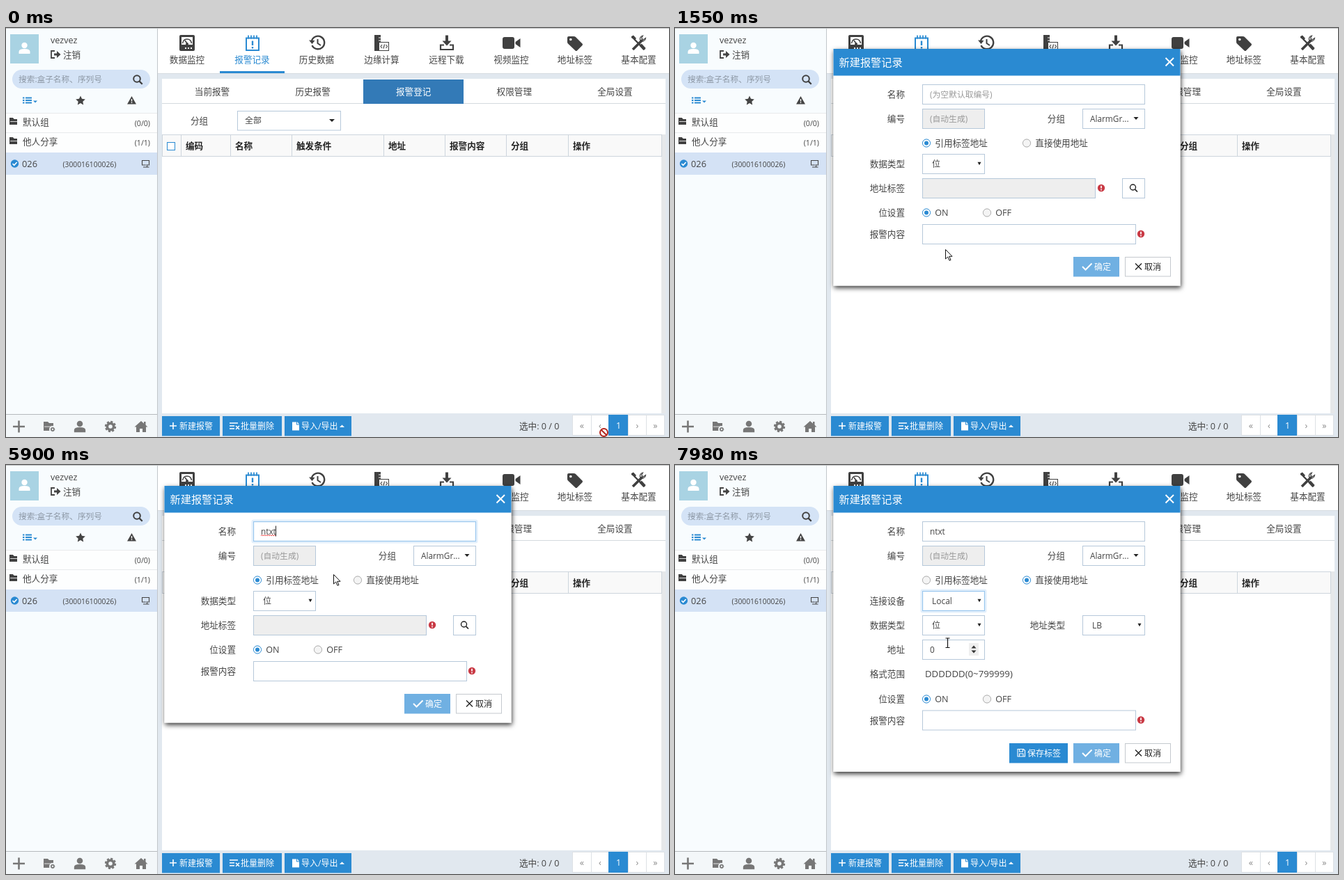
These frames come from a looping animation (952x588 px, 8000 ms). An HTML page:

```html
<!DOCTYPE html>
<html lang="zh-CN">
<head>
<meta charset="utf-8">
<title>报警登记</title>
<style>
html, body { margin: 0; width: 100%; height: 100%; overflow: hidden; background: #e1e8ef; }
svg { display: block; }
text { font-family: "Open Sans", "Noto Sans CJK SC", "Noto Sans CJK", sans-serif; white-space: pre; }
</style>
</head>
<body>
<svg id="stage" width="952" height="588" viewBox="0 0 952 588">
  <defs>
    <filter id="shadow" x="-10%" y="-10%" width="120%" height="120%">
      <feDropShadow dx="1" dy="3" stdDeviation="3.8" flood-opacity=".8"/>
    </filter>
  </defs>
  <g id="base"></g>
  <g id="dialog"></g>
  <g id="cursor"></g>
</svg>
<script>
const LOOP = 8000;
const BLUE = '#2a8ad2', INK = '#444', DARK = '#404040', EDGE = '#b6c8da', GREY = '#777';
const $ = id => document.getElementById(id);

// Drawing helpers: each returns SVG markup. Text is placed by its vertical centre.
const text = (x, cy, s, { size = 12.6, fill = INK, anchor = 'start', weight = 400 } = {}) =>
  `<text x="${x}" y="${cy + size * .37}" font-size="${size}" fill="${fill}" text-anchor="${anchor}" font-weight="${weight}">${s}</text>`;
const box = (x, y, w, h, fill, stroke, r = 0) => stroke
  ? `<rect x="${x + .5}" y="${y + .5}" width="${w - 1}" height="${h - 1}" rx="${r}" fill="${fill}" stroke="${stroke}"/>`
  : `<rect x="${x}" y="${y}" width="${w}" height="${h}" rx="${r}" fill="${fill}"/>`;
const shape = (d, fill) => `<path d="${d}" fill="${fill}"/>`;
const line = (d, stroke, w = 1) => `<path d="${d}" fill="none" stroke="${stroke}" stroke-width="${w}"/>`;
const dot = (x, y, r, fill, stroke = 'none', w = 1) =>
  `<circle cx="${x}" cy="${y}" r="${r}" fill="${fill}" stroke="${stroke}" stroke-width="${w}"/>`;
const caret = (x, y, w = 8, h = 4, fill = '#222') =>
  shape(`M${x - w / 2} ${y - h / 2}h${w}l${-w / 2} ${h}z`, fill);
const lens = (x, y, r, color, w) =>
  dot(x - 1, y - 1, r, 'none', color, w) + line(`M${x + r * .65 - .5} ${y + r * .65 - .5}l${r * .85} ${r * .85}`, color, w + .3);
const person = (x, y, k, fill) =>
  `<g transform="translate(${x} ${y}) scale(${k})">` + dot(0, -4, 4.2, fill) + shape('M-8 8v-3q0-4 8-4t8 4v3z', fill) + '</g>';
const folder = (x, y, w, h, fill) =>
  shape(`M${x} ${y}h${w * .4}l2 2h${w * .6 - 3}v${h - 2}h${1 - w}z`, fill) + line(`M${x + 1} ${y + h * .55}h${w - 2}`, '#fff', .8);
const gear = (x, y, k, fill) =>
  `<g transform="translate(${x} ${y}) scale(${k})">` + dot(0, 0, 5, 'none', fill, 4) +
  `<circle r="7.6" fill="none" stroke="${fill}" stroke-width="2.4" stroke-dasharray="3.4 2.57"/></g>`;

function sidebar() {
  let s = box(0, 0, 217, 588, '#f8fcfe') + box(6, 9, 41, 42, '#a9d3e3') + person(26.5, 29, 1, '#fff');
  s += text(64, 17.5, 'vezvez') + text(82, 38.5, '注销');
  s += line('M70 33h-5v10h5', INK, 1.8) + shape('M69 36.5h4v-3.5l5.500 5l-5.500 5v-3.500h-4z', INK);
  s += box(9, 60, 198, 27, '#d4e3f6', null, 13.5);
  s += text(18, 74, '搜索:盒子名称、序列号', { size: 11.7, fill: '#8d98a5' }) + lens(189, 74, 4.8, DARK, 2);
  s += line('M24 100.500h2.500m1.500 0h9M24 104h2.500m1.500 0h9M24 107.500h2.500m1.500 0h9', BLUE, 1.8) + caret(42, 106, 6, 3, BLUE);
  s += shape('M107 97.500l2 4.300l4.800.6l-3.500 3.300l.9 4.700l-4.200-2.300l-4.200 2.300l.9-4.700l-3.500-3.300l4.800-.6z', INK);
  s += shape('M180.500 98l6.500 11.500h-13z', INK) + line('M180.500 102v3.500m0 1v1.500', '#fff', 1.4);
  s += box(0, 122, 217, 57, '#fdfefe') + line('M0 122.500h217M0 150.500h217', '#e8eaec');
  [['默认组', '(0/0)', 135.5], ['他人分享', '(1/1)', 163.5]].forEach(([name, count, y]) => {
    s += folder(5, y - 6.5, 12, 10, DARK) + text(24, y, name);
    s += text(207, y + 1.5, count, { size: 10.6, anchor: 'end' });
  });
  s += box(0, 179, 217, 32, '#d4e2f5') + dot(12.5, 195, 5.7, BLUE) + line('M9.500 195l2.200 2.300l4-4.300', '#fff', 1.6);
  s += text(23, 195, '026', { size: 12.8 }) + text(81.5, 196, '(300016100026)', { size: 10.3 });
  s += line('M201 197h-5.500v-6.500h10v6.500h-2M197 200h5M202.500 196v4h3', INK, 1.1);
  s += box(0, 556, 217, 32, '#f3f7f9') + line('M0 555.500h217', '#b5b9bd');
  s += line('M10 573h17M18.500 564.500v17', GREY, 2.6);
  s += folder(54, 566, 15, 13, GREY) + dot(67, 577, 5, '#f3f7f9') + gear(67, 577, .38, GREY);
  s += person(106, 573, 1.02, GREY) + gear(150, 573, .93, GREY);
  s += shape('M194 565l9.500 8.500h-2.500v7.500h-5v-5h-4v5h-5v-7.500h-2.500z', GREY) + box(198, 566, 2.5, 5, GREY);
  return s + line('M217.500 0v588', '#c2c6ca');
}

function navBar() {
  let s = box(218, 0, 734, 65, '#fff') + line('M0 .5h952', '#c2c4c6') + line('M218 65.500h734', '#d5dbe0');
  const labels = ['数据监控', '报警记录', '历史数据', '边缘计算', '远程下载', '视频监控', '地址标签', '基本配置'];
  const at = [260, 353.5, 446, 539.5, 632.5, 725.5, 817, 908.5];
  labels.forEach((v, i) => s += text(at[i], 45.5, v, { anchor: 'middle', fill: i == 1 ? BLUE : INK }));
  s += box(307, 62, 93, 3, BLUE);
  // gauge, calendar, clock
  s += box(249, 10, 22, 23, DARK, null, 2) + shape('M252 13h16v11h-16z', '#fff') + line('M253.500 22q1-6 6.500-6t6.500 6M260 22l-3-4', DARK, 1.6);
  s += dot(260, 23, 2, DARK) + line('M257 29h2M261 29h2M265 29h2', '#fff', 2);
  s += line('M345 14.500h18v17.500h-18z', BLUE, 2) + line('M348 10.500v5M352 10.500v5M356 10.500v5M360 10.500v5', BLUE, 1.7) + line('M354 18.500v6.500m0 2v2.500', BLUE, 2.4);
  s += line('M439.500 25a9.300 9.300 0 1 0-.7-6', DARK, 2.4) + shape('M435 17.500l4.500 5.500l4-5z', DARK) + line('M447.500 16v6l4.500 3', DARK, 2);
  // ruler with code box, download, camera
  s += box(529, 10, 9, 23, DARK) + line('M535 14h3M535 18h3M535 22h3M535 26h3', '#fff') + box(535, 20, 15, 13, '#fff', DARK);
  s += line('M540 24l-2 2.500l2 2.500M545.500 24l2 2.500l-2 2.500M543.500 23.500l-1.500 6', DARK, 1.1);
  s += shape('M631 10.500h4v8h4.500l-6.500 7l-6.500-7h4.500z', DARK) + line('M629 24.500h-5v6.500h18v-6.500h-5', DARK, 2.2);
  s += box(713, 13, 17, 17, DARK, null, 3) + shape('M731.500 20l7-5v13l-7-5z', DARK);
  // tag, tools
  s += `<path fill-rule="evenodd" fill="${DARK}" d="M806 14q0-2 2-2h7q2 0 3 1l9.500 9.500q1.200 1.200 0 2.500l-7.500 7.500q-1.200 1.200-2.500 0l-10.500-10q-1-1-1-2.500zM809 16.500a1.800 1.800 0 1 0 3.600 0a1.800 1.800 0 1 0-3.600 0"/>`;
  s += line('M902 16l15 15', DARK, 2.4) + line('M911 24l6 6.500', DARK, 4.6) + line('M914 17l-14 14', DARK, 3.8);
  s += line('M918.500 14.500l-3.500 2.500l-2.500-2.500l2-3.500a5 5 0 0 0-3.500 7.500a5 5 0 0 0 7.500-4z', DARK, 1.2) + shape('M898 12l3-1.500l4 4.500l-2.500 2.500l-4.500-3.500z', DARK);
  return s;
}

function content() {
  let s = box(224, 73, 723, 481, '#fff') + box(513, 74, 144, 35, '#337ab7');
  ['当前报警', '历史报警', '报警登记', '权限管理', '全局设置'].forEach((v, i) =>
    s += text(296 + i * 144.6, 91.5, v, { anchor: 'middle', fill: i == 2 ? '#fff' : INK, weight: i == 2 ? 500 : 400 }));
  s += line('M224 108.500h289M657 108.500h290', '#d4dade');
  s += text(265, 133, '分组') + box(332, 119, 149, 28.5, '#fff', EDGE) + text(343, 133, '全部', { size: 11.9 }) + caret(468, 133);
  s += box(941, 153, 6, 401, '#e6e8ea') + box(224, 153, 718, 32, '#f9f9f9', '#cdd5dd');
  [251, 322, 410, 542, 630, 718, 807].forEach((x, i) => {
    s += line(`M${x + .5} 153v32`, '#cdd5dd');
    s += text(x + 7, 169.5, ['编码', '名称', '触发条件', '地址', '报警内容', '分组', '操作'][i], { weight: 700, fill: '#222' });
  });
  s += box(231, 164, 12, 12, '#fff', BLUE);
  const label = { size: 12, fill: '#fff', weight: 500 };
  s += box(224, 558, 83, 28.5, BLUE) + line('M235 572h10M240 567v10', '#fff', 1.6) + text(249, 572.5, '新建报警', label);
  s += box(311, 558, 85, 28.5, BLUE) + line('M321 568h12M321 572h7M321 576h7M330 572l5 5m0-5l-5 5', '#fff', 1.5) + text(337, 572.5, '批量删除', label);
  s += box(400, 558, 96, 28.5, BLUE) + shape('M411 566.500h6v4h4v8h-10zM418 566l3 3.500h-3z', '#fff') + text(424, 572.5, '导入/导出', label);
  s += shape('M479 574h7l-3.500-3.500z', '#fff') + text(737, 572, '选中: 0 / 0');
  [813, 840, 865, 893, 919].forEach((x, i) => {
    const w = [28, 26, 29, 27, 27][i], on = i == 2;
    s += box(x, 556, w, 30, on ? BLUE : '#fff', on ? BLUE : '#dde1e5');
    s += text(x + w / 2, 571, '«‹1›»'[i], { anchor: 'middle', fill: on ? '#fff' : '#888' });
  });
  return s;
}

// Form parts; y is the centre line of the row.
const label = (y, s, x = 330) => text(x, y + .5, s, { anchor: 'end' });
const field = (x, y, w, s = '', off = false) =>
  box(x, y - 14, w, 29, off ? '#eee' : '#fff', EDGE) + text(x + 11, y + .5, s, { size: 11.8, fill: off || s[0] == '(' ? '#999' : INK });
const select = (x, y, s) => field(x, y, 90) +
  `<svg x="${x + 14}" y="${y - 14}" width="52" height="29">${text(0, 14.8, s, { size: 12 })}</svg>` + caret(x + 82, y, 5, 4.5);
const radio = (x, y, on, s) => dot(x, y + .5, 5.6, on ? '#fff' : '#f4f4f4', on ? BLUE : '#aaa') +
  (on ? dot(x, y + .5, 3, BLUE) : '') + text(x + 12.3, y + .5, s);
const bang = (x, y) => dot(x, y, 5.2, '#c93a45') + line(`M${x} ${y - 3.2}v3.800m0 1.200v1.600`, '#fff', 1.7);
const glow = (x, y, w, k = 1) => `<g opacity="${k}" fill="none">` +
  `<rect x="${x - .5}" y="${y - 14.5}" width="${w + 1}" height="30" rx="1" stroke="#e2effb" stroke-width="4"/>` +
  `<rect x="${x + .5}" y="${y - 13.5}" width="${w - 1}" height="28" stroke="#98c6ee"/></g>`;
const group = (y, s) => label(y, '分组', 560) + field(585, y, 90, s) + caret(662, y, 7, 4);
const sources = (y, direct) => radio(361, y, !direct, '引用标签地址') + radio(505, y, direct, '直接使用地址');
const message = (y, yText) => label(y, '位设置') + radio(361, y, true, 'ON') + radio(448, y, false, 'OFF') +
  label(yText, '报警内容') + field(355, yText, 307) + bang(669, yText);
const tagRow = y => label(y, '地址标签') + field(355, y, 249, '', true) + bang(612, y) + field(642, y, 33) + lens(658.5, y, 4, '#222', 1.4);
const actions = y => box(572, y - 14, 66, 28.5, '#70b0e2') + line(`M585 ${y}l4.500 4.500l9-9`, '#fff', 2) +
  text(602, y + .5, '确定', { size: 12, fill: '#fff', weight: 500 }) + box(646, y - 14, 66, 28.5, '#fff', '#c4c9ce') +
  line(`M661 ${y - 4.5}l9 9m0-9l-9 9`, '#222', 1.4) + text(674, y + .5, '取消', { size: 12, fill: '#222' });

function loadingForm(t) {
  let s = label(95, '名称') + field(355, 95, 320, '(为空默认取编号)') + label(130, '名称') + field(355, 130, 307) + bang(669, 130);
  s += label(165, '编号') + field(355, 165, 90, '(自动生成)', true) + group(165, '请选择');
  s += line('M641.500 164a5 5 0 0 1 8.500-3M651.500 166a5 5 0 0 1-8.500 3', '#222', 2) + shape('M652.500 158v6h-6zM640.500 172v-6h6z', '#222') + line('M644 167l5-4', BLUE, 2);
  s += sources(200, false) + label(230, '数据类型') + select(355, 230, '位') + tagRow(265);
  const lead = 2 + Math.floor((t - 1300) / 80);
  for (let i = 0; i < 5; i++) {
    const gap = Math.abs(((i - lead + 2) % 5 + 5) % 5 - 2);
    s += `<g opacity="${[1, .58, .32][gap]}">${box(462 + i * 7.6, 262, 6, 13, BLUE)}</g>`;
  }
  s += box(355, 289, 12, 12, '#fff', BLUE) + text(371, 295.5, '使用字寄存器的按位索引', { size: 12.45 }) + text(512, 295.5, '[固件不支持]', { size: 12.3, fill: '#e01515' });
  s += label(325, '地址') + field(355, 325, 249, '', true) + bang(612, 325);
  s += label(360, '按位索引') + field(355, 360, 77) + bang(440, 360);
  s += label(395, '地址') + dot(456.5, 398, 1.5, '#222') + label(427.5, '格式范围') + label(457, '条件');
  for (const y of [457, 492]) s += select(355, y, '等于') + field(471, y, 89, '0');
  return s + select(585, 457, '无') + message(527, 558);
}

const TYPED = [3330, 4040, 4420, 4570], ENDS = [366.5, 373.5, 377.5, 383.5, 387.5];
const BLINKS = [2090, 2570, 3100, 3880, 4040, 5120, 5350, 6200];

function nameRow(t) {
  const n = TYPED.filter(k => t >= k).length;
  let s = label(95, '名称') + field(355, 95, 320, n ? 'ntxt'.slice(0, n) : '(为空默认取编号)');
  if (t >= 2020 && t < 6280) s += glow(355, 95, 320, Math.min(1, .5 + (t - 2020) / 140));
  if (BLINKS.filter(k => t >= k).length % 2) s += line(`M${ENDS[n]} 87.500v15`, '#222');
  if (t >= 5350 && t < 6280) s += line('M366 102' + 'l1.500-1.500l1.500 1.500'.repeat(7), '#e33', .9);
  return s + label(130, '编号') + field(355, 130, 90, '(自动生成)', true) + group(130, 'AlarmGr...');
}

const tagForm = t => nameRow(t) + sources(165, false) + label(195, '数据类型') + select(355, 195, '位') +
  tagRow(230) + message(265, 296) + actions(343);

const DEVICES = ['KAVnor MRTP', 'XQZ', 'XQZ DK 500N_OrbVEL', 'Local'];

function directForm(t, pointerY) {
  const local = t >= 7830, picked = t >= 7680;
  let s = nameRow(t) + sources(165, true);
  if (t < 7130) s += dot(505, 165.5, 6.6, 'none', '#b5d6f1', 1.4);
  s += label(195, '连接设备') + select(355, 195, DEVICES[picked ? 3 : 0]);
  if (!local) s += label(195, '站号', 560) + field(585, 195, 90, '1');
  s += label(230, '数据类型') + select(355, 230, '位') + label(230, '地址类型', 560) + select(585, 230, local ? 'LB' : 'BV');
  s += label(265, '地址') + field(355, 265, 90, '0');
  if (local) s += box(422, 256, 14, 18, '#efefef') + shape('M425.500 263.500h7l-3.500-4z', '#333') + caret(429, 268.5, 7, 4, '#333');
  s += label(300, '格式范围') + text(359, 300.5, local ? 'DDDDDD(0~799999)' : 'DDDDD(0~65535)', { size: 13.2 });
  s += message(336, 366.5) + box(480, 400, 84, 28.5, BLUE) + line('M492 408.500h8.500l2 2v8.500h-10.500zM494.500 408.500v3.500h5v-3.500M494.500 419v-4h5.500v4', '#fff', 1.1);
  s += text(506, 414.5, '保存标签', { size: 12, fill: '#fff', weight: 500 }) + actions(414);
  if (picked) s += glow(355, 195, 90);
  else if (t >= 7130) {
    const hot = Math.max(0, Math.min(3, Math.floor((pointerY - 210) / 16.7)));
    s += box(355, 209, 141, 69, '#fff', '#5a9bd8') + box(356, 210 + hot * 16.7, 139, 17, '#1e90ff');
    DEVICES.forEach((v, i) => s += text(369, 218.5 + i * 16.7, v, { size: 12.1, fill: i == hot ? '#fff' : INK }));
  }
  return s;
}

function dialog(t, pointerY) {
  if (t < 1170) return '';
  const [form, bottom] = t < 1470 ? [loadingForm, 640] : t < 6280 ? [tagForm, 370.5] : [directForm, 441];
  const shown = Math.min(1, (t - 1130) / 140);
  return `<g opacity="${shown}" transform="translate(0 ${-8 * (1 - shown)})">` +
    `<g filter="url(#shadow)">${box(227.5, 30, 498, bottom - 30, '#fff')}</g>` + box(227.5, 30, 498, 38.5, BLUE) +
    text(235.5, 49.5, '新建报警记录', { size: 15.2, fill: '#fff' }) + line('M704.500 43l11.500 11.500m0-11.500l-11.500 11.500', '#fff', 2) +
    form(t, pointerY) + '</g>';
}

// Pointer path: time, x, y
const PATH = [
  [0, 858, 580], [70, 858, 580], [230, 770, 470], [390, 640, 392], [500, 540, 388], [640, 400, 450], [760, 300, 545],
  [840, 267, 571], [1170, 267, 571], [1320, 267, 554], [1390, 267, 554], [1540, 380, 330], [1700, 490, 150], [1850, 512, 99],
  [5350, 512, 99], [5430, 590, 108], [5510, 655, 128], [5590, 610, 140], [5670, 540, 143], [5820, 490, 150], [5900, 470, 157],
  [6050, 495, 163], [6200, 507, 161], [6590, 507, 161], [6750, 440, 172], [6870, 358, 186], [6990, 394, 195], [7130, 394, 195],
  [7250, 393, 212], [7400, 390, 240], [7600, 391, 267], [7680, 391, 267], [7980, 391, 255], [8000, 391, 255]
];
function pointer(t) {
  const i = PATH.findIndex(p => p[0] > t), [t0, x0, y0] = PATH[i - 1], [t1, x1, y1] = PATH[i];
  const k = (t - t0) / (t1 - t0);
  return [x0 + (x1 - x0) * k, y0 + (y1 - y0) * k];
}
const CURSORS = {
  blocked: dot(0, 1, 5.5, '#fff', '#b3261e', 2) + line('M-4-3l8 8', '#b3261e', 2),
  arrow: '<path d="M0 0v13.500l3.200-3l2.300 5.300l2-.9l-2.300-5.100h4.300z" fill="#fff" stroke="#111"/>',
  hand: '<path d="M-1 0q1.500-1.500 2.500 0v6l6 1.500q1.500.5 1.500 2.500l-1.500 7h-8l-4.500-7q0-2 2-1l2 2z" fill="#fff" stroke="#111"/>',
  beam: line('M-3-6.500h2.500l.5.500l.5-.5h2.500M0-6v12.500M-3 7h2.500l.5-.5l.5.5h2.500', '#111', 1.2)
};
const cursorKind = t => t < 110 ? 'blocked' : t < 800 ? 'arrow' : t < 1170 ? 'hand' :
  t < 1830 ? 'arrow' : t < 5500 ? 'beam' : t < 7680 ? 'arrow' : 'beam';

const last = {};
function put(id, markup) {
  if (last[id] !== markup) $(id).innerHTML = last[id] = markup;
}
function draw(now) {
  const t = now % LOOP, [x, y] = pointer(t);
  put('dialog', dialog(t, y));
  put('cursor', CURSORS[cursorKind(t)]);
  $('cursor').setAttribute('transform', `translate(${Math.round(x) + .5} ${Math.round(y) + .5})`);
}

$('base').innerHTML = sidebar() + navBar() + content();
const start = performance.now();
function tick() {
  draw(performance.now() - start);
  requestAnimationFrame(tick);
}
tick();
</script>
</body>
</html>
```
